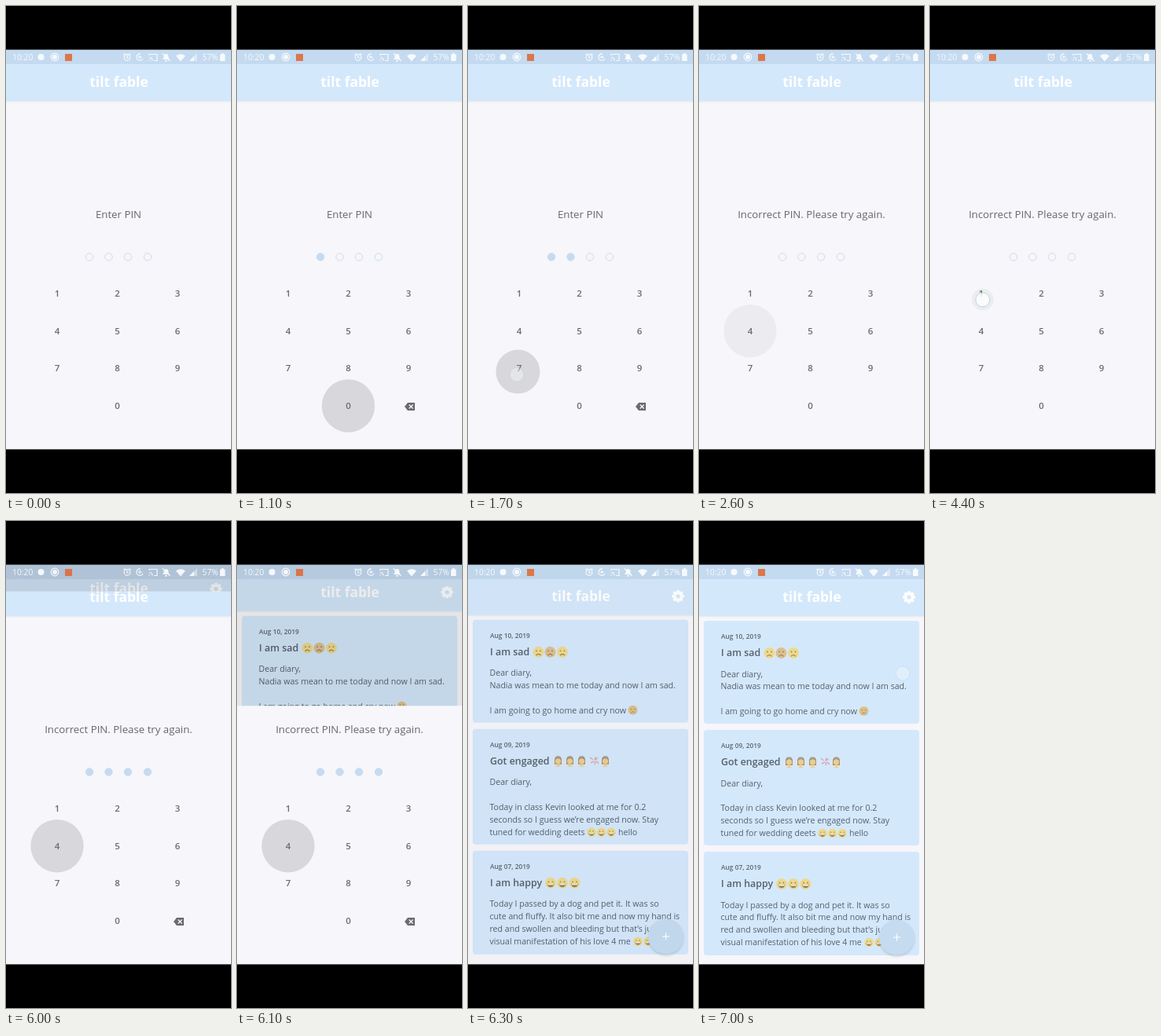
An HTML page for the animation above (7100 ms loop, 286x620 px).

```html
<!DOCTYPE html>
<html lang="en">
<head>
<meta charset="utf-8">
<title>PIN diary</title>
<style>
  html, body { margin: 0; width: 100%; height: 100%; overflow: hidden; background: #000; }
  svg { display: block; width: 286px; height: 620px; font-family: "Open Sans", "Noto Sans", sans-serif; }
  .key { font-size: 11.5px; font-weight: 600; fill: #6b6a6e; text-anchor: middle; }
  .prompt { font-size: 13.25px; fill: #68676b; text-anchor: middle; }
  .brand { font-size: 17.5px; font-weight: 700; fill: #fff; text-anchor: middle; }
  .date { font-size: 8.4px; font-weight: 600; fill: #5c6771; }
  .head { font-size: 12.4px; font-weight: 600; fill: #56616b; }
  .body { font-size: 10.6px; fill: #56616c; }
  .status { font-size: 10.3px; fill: #fff; }
  .line { fill: none; stroke: #fff; stroke-width: 1.2; }
</style>
</head>
<body>
<svg viewBox="0 0 286 620">
  <defs>
    <clipPath id="reveal"><rect id="revealBox" y="55" width="286" height="0"/></clipPath>
    <filter id="soft" x="-30%" y="-30%" width="160%" height="160%"><feGaussianBlur stdDeviation="1.8"/></filter>
  </defs>
  <rect width="286" height="620" fill="#f7f6fa"/>
  <g id="lock"></g>
  <g id="diary" clip-path="url(#reveal)">
    <g id="page"></g>
    <rect y="55" width="286" height="19" fill="#c4daf0"/>
    <rect id="dim" y="55" width="286" height="510"/>
  </g>
  <g id="status" opacity=".88"></g>
  <circle id="pointer" r="9" fill="#fff" stroke="#a9d3e2" stroke-width="1"/>
  <rect width="286" height="55.6"/>
  <rect y="564.4" width="286" height="55.6"/>
</svg>
<script>
const LOOP = 7100, STEP = 100;
const byId = id => document.getElementById(id);

function add(parent, tag, attrs, text) {
  const el = document.createElementNS('http://www.w3.org/2000/svg', tag);
  for (const name in attrs) el.setAttribute(name, attrs[name]);
  if (text !== undefined) el.textContent = text;
  return parent.appendChild(el);
}
const set = (el, attrs) => { for (const name in attrs) el.setAttribute(name, attrs[name]); };
const label = (parent, cls, x, y, text) => add(parent, 'text', { class: cls, x, y }, text);
const path = (parent, d, attrs) => add(parent, 'path', { d, ...attrs });
const disc = (parent, cx, cy, r, fill) => add(parent, 'circle', { cx, cy, r, fill });
const box = (parent, x, y, width, height, fill, rx = 0) =>
  add(parent, 'rect', { x, y, width, height, fill, rx });

function appBar(parent) {
  box(parent, 0, 121, 286, 1.5, '#ebecf0');
  box(parent, 0, 55, 286, 66, '#d4e8fc');
  label(parent, 'brand', 143.5, 103, 'tilt fable');
}

// Lock screen
const lock = byId('lock');
appBar(lock);
box(lock, 0, 55, 286, 19, '#c4daf0');
const prompt = label(lock, 'prompt', 143, 270, '');
const dots = [106, 130.5, 155, 180].map(x =>
  add(lock, 'circle', { cx: x, cy: 319.5, r: 4.7, 'stroke-width': 1 }));
const ripples = add(lock, 'g', {});
const keyAt = n => n ? [65 + (n - 1) % 3 * 76.5, 366 + Math.floor((n - 1) / 3) * 47.7] : [141.5, 509];
for (let n = 0; n < 10; n++) {
  const [x, y] = keyAt(n);
  label(lock, 'key', x, y + 4, n);
}
const erase = add(lock, 'g', {});
path(erase, 'M213 510l4-5h9v10h-9z', { fill: '#6b6a6e' });
path(erase, 'M218.7 507.5l5 5m0-5l-5 5', { class: 'line' });

// Each press: key, start, time held, pointer offset from the key
const presses = [
  [0, 900, 200, 1, 7], [7, 1600, 200, -3, 8], [9, 1950, 200, 1, 7], [4, 2300, 200, 2, 5],
  [1, 4350, 200, 2, 8], [2, 5000, 200, 1, 6], [3, 5350, 200, 1, 6], [4, 5700, 400, 2, 5]
].map(([key, start, hold, dx, dy]) => {
  const [x, y] = keyAt(key);
  return { start, hold, x, y, px: x + dx, py: y + dy, ripple: add(ripples, 'circle', {}) };
});

// Diary page
const page = byId('page');
box(page, 0, 40, 286, 540, '#f7f6fa');
appBar(page);

const gear = add(page, 'g', { transform: 'translate(267 97) scale(1.06)' });
for (let i = 0; i < 4; i++)
  add(gear, 'rect', { x: -1.8, y: -7.3, width: 3.6, height: 14.6, rx: .7, fill: '#fff', transform: `rotate(${i * 45})` });
disc(gear, 0, 0, 5.6, '#fff');
disc(gear, 0, 0, 2.5, '#d4e8fc');

function face(x, y, r, mood, tone = '#eed98c') {
  const g = add(page, 'g', { transform: `translate(${x} ${y}) scale(${r / 7})` });
  const ink = '#97835a';
  disc(g, 0, 0, 7, tone);
  disc(g, -2.5, -1.5, .9, ink);
  disc(g, 2.5, -1.5, .9, ink);
  if (mood === 'glad') {
    path(g, 'M-4.500 .8h9q-1 4.500-4.500 4.500t-4.500-4.500', { fill: ink });
    box(g, -3.6, .9, 7.2, 1.6, '#fbf7e8');
  } else {
    path(g, 'M-3 4.300q3-3.600 6 0', { fill: 'none', stroke: ink, 'stroke-width': 1.1 });
  }
  if (mood === 'cry') path(g, 'M3 1q3 4 0 4.500t0-4.500', { fill: '#9cc4de' });
}

function bride(x, y) {
  const g = add(page, 'g', { transform: `translate(${x} ${y})` });
  path(g, 'M-6 7V-1a6 6.500 0 0 1 12 0v8z', { fill: '#dfe6ea' });
  path(g, 'M-4.500 4V-2a4.500 4.500 0 0 1 9 0v6z', { fill: '#a08f78' });
  disc(g, 0, 0, 3.7, '#e9cd8f');
  path(g, 'M-3.500 7q3.500-5 7 0z', { fill: '#e9cd8f' });
  path(g, 'M-3-5.500h6', { stroke: '#9aa9b3', 'stroke-width': 1.5 });
}

function burst(x, y) {
  path(page, `M${x - 5} ${y - 5}l3.500 3m3.500-3.500l-1 4m4-3l-4 3m-5 3.500l4-2m1 4l1-4m4 3l-3-3`,
    { fill: 'none', stroke: '#dba5ae', 'stroke-width': 1.4 });
}

function card(y, height, date, title, lines) {
  box(page, 6, y, 274, height, '#d4e8fc', 4);
  label(page, 'date', 28, y + 23, date);
  label(page, 'head', 28, y + 45, title);
  lines.forEach((text, i) => text && label(page, 'body', 27.5, y + 71.5 + i * 15.8, text));
}

card(127, 131, 'Aug 10, 2019', 'I am sad',
  ['Dear diary,', 'Nadia was mean to me today and now I am sad.', '', 'I am going to go home and cry now']);
face(89.5, 168, 7, 'sad');
face(104.5, 168, 7, 'sad', '#dcbf90');
face(120, 168, 7, 'sad');
face(209.5, 242, 6, 'cry', '#dfc088');

card(266, 147, 'Aug 09, 2019', 'Got engaged',
  ['Dear diary,', '', 'Today in class Kevin looked at me for 0.2',
   'seconds so I guess we\u2019re engaged now. Stay', 'tuned for wedding deets']);
[114.5, 129.5, 144.5, 174.5].forEach(x => bride(x, 307));
burst(160, 307);
[157, 169.5, 182].forEach(x => face(x, 397.5, 5.8, 'glad'));
label(page, 'body', 191, 400.7, 'hello');

card(421, 132, 'Aug 07, 2019', 'I am happy',
  ['Today I passed by a dog and pet it. It was so', 'cute and fluffy. It also bit me and now my hand is',
   'red and swollen and bleeding but that\u2019s just a', 'visual manifestation of his love 4 me']);
[105, 120, 135.5].forEach(x => face(x, 462, 7, 'glad'));
[216, 229].forEach(x => face(x, 536.5, 5.8, 'glad'));

add(page, 'circle', { cx: 251.5, cy: 532, r: 22.5, fill: '#8298ad', opacity: .4, filter: 'url(#soft)' });
disc(page, 251.5, 530, 22.5, '#c5dbf0');
path(page, 'M247 530h9m-4.500-4.500v9', { class: 'line' });

// Status bar
const status = byId('status');
label(status, 'status', 8, 69, '10:20');
disc(status, 44.5, 65, 4, '#fff');
add(status, 'circle', { cx: 62, cy: 65, r: 4.8, class: 'line' });
disc(status, 62, 65, 3, '#fff');
box(status, 75, 61, 9, 9, '#df6a35');
add(status, 'circle', { cx: 154, cy: 65.5, r: 3.8, class: 'line' });
path(status, 'M154 63v3h2M149.500 62.500l2-2m7 2l-2-2', { class: 'line' });
path(status, 'M171 61a4.200 4.200 0 1 0 3 6M170 63v4m-2-2h5', { class: 'line' });
path(status, 'M182 63v-1.500h10v8h-4M182 65.500q4 0 4 4M182 68v1.500', { class: 'line' });
path(status, 'M199 68h9l-1.500-2v-2q-.5-3-3-3t-3 3v2zM202 69h3v1.500h-3z', { fill: '#fff' });
path(status, 'M199 60.500l9.500 9.500', { class: 'line' });
path(status, 'M216 63.500q6-4.500 12 0l-6 7z', { fill: '#fff' });
path(status, 'M233 70l10-10v10z', { fill: '#fff', opacity: .45 });
path(status, 'M233 70l6-6v6z', { fill: '#fff' });
label(status, 'status', 249.5, 69, '57%');
path(status, 'M272 61.500h2v-1.500h2.500v1.500h2v8.500h-6.500z', { fill: '#fff' });

const pointer = byId('pointer'), revealBox = byId('revealBox'), dim = byId('dim');
const clamp = v => Math.max(0, Math.min(1, v));
const within = (t, from, to) => t >= from && t < to;

function draw(t) {
  let touch = { opacity: 0 };
  for (const p of presses) {
    const age = t - p.start;
    const move = clamp(age / 120);
    const fade = 1 - clamp((age - p.hold) / 150);
    set(p.ripple, {
      cx: p.px + (p.x - p.px) * move ** 4,
      cy: p.py + (p.y - p.py) * move ** 4,
      r: Math.min(33.7, Math.max(0, age * .28)),
      'fill-opacity': .125 * clamp(age / 100) ** 1.7 * fade
    });
    if (within(age, 0, 101)) touch = { cx: p.px, cy: p.py, opacity: age > 60 ? .35 : .8 };
  }
  if (t >= 7000) touch = { cx: 259, cy: 194, opacity: .3 };
  set(pointer, touch);

  const failed = t >= 2400;
  const entered = presses.filter((p, i) => (i > 3) === failed && t >= p.start + 100).length;
  dots.forEach((dot, i) => set(dot, i < entered
    ? { fill: '#c4dbf2', stroke: '#c4dbf2' }
    : { fill: 'none', stroke: '#c8dfea' }));
  prompt.textContent = failed ? 'Incorrect PIN. Please try again.' : 'Enter PIN';
  set(erase, { opacity: within(t, 1000, 2500) || t >= 4500 ? 1 : 0 });

  const slide = clamp((t - 5950) / 500);
  set(revealBox, { height: 510 * clamp((t - 5950) / 300) ** 1.5 });
  set(page, { transform: `translate(0 ${-13 * (1 - slide) ** 2})` });
  set(dim, { opacity: .13 * (1 - slide) ** 1.6 });
}

const begin = performance.now();
function tick() {
  const t = (performance.now() - begin) % LOOP;
  draw(within(t, 2600, 4400) ? 2600 : Math.floor(t / STEP) * STEP);
  requestAnimationFrame(tick);
}
tick();
</script>
</body>
</html>
```
